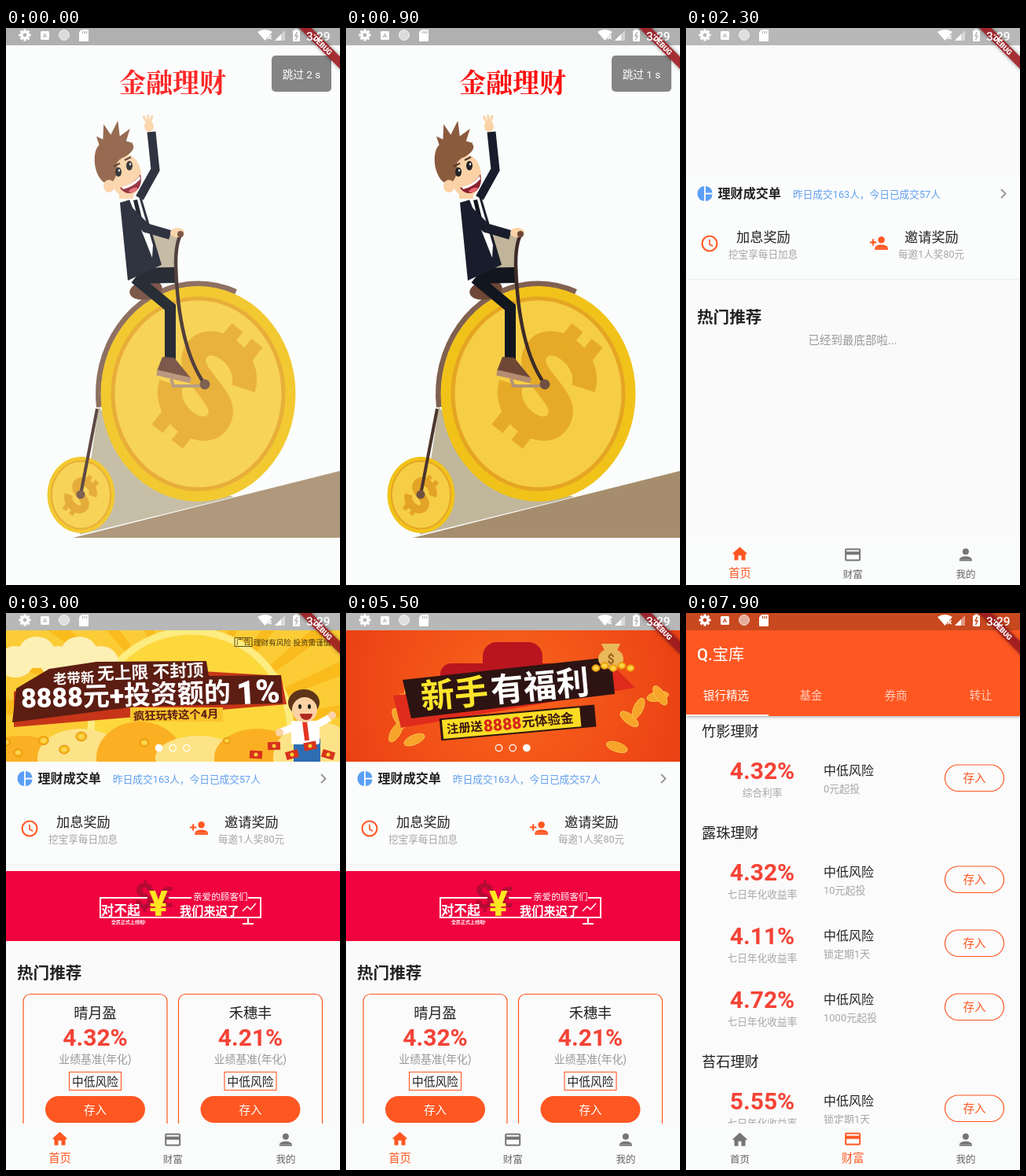
Write an HTML page with a canvas that moves like this. It is 425 px wide and 708 px high and loops after 8 s.

```html
<!DOCTYPE html>
<html lang="zh-CN">
<head>
<meta charset="utf-8">
<title>理财</title>
<style>
html, body { margin: 0; width: 100%; height: 100%; overflow: hidden; background: #fafafa; }
canvas { display: block; width: 425px; height: 708px; }
</style>
</head>
<body>
<canvas id="stage" width="425" height="708"></canvas>
<script>
const g = document.getElementById('stage').getContext('2d');
const W = 425, H = 708, LOOP = 8000, PI = Math.PI, TAU = PI * 2;
const SANS = 'Roboto, "Noto Sans CJK SC", "Noto Sans CJK", sans-serif';
const SERIF = '"Noto Serif CJK SC", "Noto Sans CJK SC", "Noto Sans CJK", serif';
const ORANGE = '#ff5722', RED = '#f44336', INK = '#222', GREY = '#a6a6a6', WHITE = '#fff';
const SKIN = '#fbd2a5', HAIR = '#8b5b3e', BLACK = { weight: 900 };

// ---------- drawing helpers ----------
function rect(x, y, w, h, fill) {
  g.fillStyle = fill;
  g.fillRect(x, y, w, h);
}

function paint(fill, stroke, width = 1) {
  if (fill) { g.fillStyle = fill; g.fill(); }
  if (stroke) { g.strokeStyle = stroke; g.lineWidth = width; g.stroke(); }
}

function round(x, y, w, h, r, fill, stroke, width) {
  g.beginPath();
  g.roundRect(x, y, w, h, r);
  paint(fill, stroke, width);
}

function oval(x, y, rx, ry, fill, stroke, width, turn = 0) {
  g.beginPath();
  g.ellipse(x, y, rx, ry, turn, 0, TAU);
  paint(fill, stroke, width);
}

function arc(x, y, rx, ry, from, to, fill, stroke, width) {
  g.beginPath();
  g.ellipse(x, y, rx, ry, 0, from, to);
  paint(fill, stroke, width);
}

function trace(pts) {
  g.beginPath();
  for (let i = 0; i < pts.length; i += 2) g.lineTo(pts[i], pts[i + 1]);
}

function poly(fill, ...pts) {
  trace(pts);
  g.closePath();
  paint(fill);
}

function line(color, width, ...pts) {
  trace(pts);
  paint(null, color, width);
}

function curve(d, fill, stroke, width) {
  const p = new Path2D(d);
  if (fill) { g.fillStyle = fill; g.fill(p); }
  if (stroke) { g.strokeStyle = stroke; g.lineWidth = width; g.stroke(p); }
}

// y is the middle of the glyphs
function text(s, x, y, size, color, { align = 'left', weight = 400, font = SANS } = {}) {
  g.font = `${weight} ${size}px ${font}`;
  g.textAlign = align;
  g.fillStyle = color;
  g.fillText(s, x, y + size * .37);
}
const mid = (s, x, y, size, color, opt) => text(s, x, y, size, color, { align: 'center', ...opt });

function at(x, y, turn, draw, scale = 1) {
  g.save();
  g.translate(x, y);
  g.rotate(turn);
  g.scale(scale, scale);
  draw();
  g.restore();
}

const tilted = (s, x, y, turn, size, color) => at(x, y, turn, () => text(s, 0, 0, size, color, BLACK));

function random(seed) {
  return () => (seed = seed * 16807 % 2147483647) / 2147483647;
}

const ramp = (t, from, to) => Math.min(1, Math.max(0, (t - from) / (to - from)));

// cubic-bezier(.25, .1, .25, 1)
function ease(t) {
  let lo = 0, hi = 1, u = t;
  for (let i = 0; i < 20; i++) {
    u = (lo + hi) / 2;
    if (.75 * u * (1 - u) + u ** 3 < t) lo = u; else hi = u;
  }
  return .3 * u * (1 - u) ** 2 + 3 * u * u * (1 - u) + u ** 3;
}

// ---------- icons, centred on 0,0 ----------
const ICON = {
  home(c) {
    poly(c, 0, -9, 10, 0, -10, 0);
    rect(-7, -1, 5, 9, c);
    rect(2, -1, 5, 9, c);
    rect(-7, -1, 14, 3, c);
  },
  card(c) {
    round(-9, -7, 18, 14, 1, null, c, 2);
    rect(-9, -4, 18, 4, c);
  },
  person(c) {
    oval(0, -4, 4, 4, c);
    arc(0, 6, 8, 4, PI, TAU, c);
    rect(-8, 6, 16, 2, c);
  },
  invite(c) {
    at(3, 0, 0, () => ICON.person(c));
    line(c, 2, -11, -1, -3, -1);
    line(c, 2, -7, -5, -7, 3);
  },
  pie(c) {
    arc(-1, 0, 9, 10, PI / 2, PI * 1.5, c);
    for (const s of [-1, 1]) {
      at(1, s, 0, () => {
        g.scale(1, s);
        g.beginPath();
        g.moveTo(0, 0);
        g.arc(0, 0, 9, 0, PI / 2);
        paint(c);
      });
    }
  },
  next(c) { line(c, 2, -2.500, -5.500, 3, 0, -2.500, 5.500); },
  clock(c) {
    oval(0, 0, 9, 9, null, c, 2);
    line(c, 1.6, 0, -5, 0, 1, 4, 3);
  }
};
const icon = (name, x, y, color, scale = 1) => at(x, y, 0, () => ICON[name](color), scale);

// ---------- status bar ----------
function statusBar(color) {
  rect(0, 0, W, 22, color);
  for (let i = 0; i < 8; i++) at(24, 9, i * TAU / 8, () => rect(-1.6, -7.5, 3.2, 4, WHITE));
  oval(24, 9, 4, 4, null, WHITE, 3.2);
  round(44, 4, 11, 11, 1.5, WHITE);
  mid('A', 49.5, 9.5, 8, color, { weight: 700 });
  oval(74, 9, 6.5, 6.5, 'rgba(255,255,255,.55)', 'rgba(255,255,255,.75)', 1);
  round(93, 2, 12, 15, [5, 1, 1, 1], WHITE);
  for (let i = 0; i < 3; i++) rect(97 + i * 2.5, 4, 1.2, 3, color);
  curve('M320 5Q329.5-1 339 5L329.5 16Z', WHITE);
  mid('×', 335.5, 12, 12, WHITE, { weight: 700 });
  poly('rgba(255,255,255,.45)', 342, 16, 355, 3, 355, 16);
  poly(WHITE, 342, 16, 350, 8, 350, 16);
  round(365, 3, 9, 14, 1, WHITE);
  rect(367.5, 1.5, 4, 2, WHITE);
  line(color, 1.5, 370.5, 5, 368, 10, 371, 10, 368.5, 15);
}

function ribbon() {
  at(W, 0, PI / 4, () => {
    g.shadowColor = 'rgba(0,0,0,.5)';
    g.shadowBlur = 5;
    rect(-40, 25.7, 80, 11, 'rgba(165,28,34,.85)');
    g.shadowBlur = 0;
    mid('DEBUG', 0, 31.2, 9.4, WHITE, BLACK);
  });
  text('3:29', 382, 10, 15.5, WHITE, { weight: 500 });
}

// ---------- splash ----------
function dollar(x, y, scale, color) {
  at(x, y, .67, () => {
    curve('M38-26C24-64-44-60-38-24C-32 8 32-8 38 24C44 60-24 64-38 26', null, color, 31);
    for (const sy of [-1, 1]) for (const sx of [-1, 1]) rect(sx * 16 - 9, sy * 66 - 16, 18, 32, color);
  }, scale);
}

function coin(x, y, rx, ry, rim) {
  oval(x, y, rx, ry, '#f1c31a');
  oval(x, y, rx * .875, ry * .885, '#f6ce45', '#e5a523', rim);
}

function bike() {
  poly('#a68d6d', 85, 648, W, 563, W, 648);
  poly('#c0b79d', 118, 481, 175, 560, 290, 596, 94, 644);
  arc(244.5, 465, 127, 140, 3.02, 5.1, null, '#806050', 7);
  coin(244.5, 465, 124, 137, 5);
  dollar(256, 455, 1, '#e6aa27');
  coin(95.5, 593.5, 43, 48.5, 2);
  dollar(95, 594, .33, '#e3a326');
  line('#4c352d', 4, 116, 484, 95, 593);
  oval(95, 593, 5.5, 5.5, '#705242');
}

function head() {
  rect(144, 200, 18, 17, SKIN);
  oval(153, 188, 19, 27, SKIN);
  oval(127, 172, 14, 26, HAIR, null, 0, -.15);
  oval(141, 156, 22, 11, HAIR, null, 0, -.3);
  for (let i = 0; i < 5; i++) {
    at(135, 160, -2.3 + i * .45, () => poly(HAIR, 0, -13, 30 + 13 * Math.sin(i * PI / 4), 0, 0, 13));
  }
  oval(131, 201, 7, 8, SKIN);
  for (const [x, y] of [[143, 183], [157, 175]]) {
    oval(x, y, 4, 6, '#252426');
    oval(x + 1, y - 2, 1.2, 1.5, WHITE);
    line('#51372b', 2, x - 6, y - 7, x + 2, y - 11);
  }
  curve('M145 203Q162 200 171 186Q175 205 159 210Q150 211 145 203Z', '#8d2230');
  curve('M147 202Q162 199 170 188L171 192Q162 202 149 205Z', WHITE);
  oval(162, 206, 6, 2.5, '#e76573', null, 0, -.4);
}

function rider() {
  const suit = '#191d2b', trousers = '#12161f', brown = '#6e4736';
  poly('#c0b59b', 184, 256, 220, 265, 215, 326, 188, 300);
  oval(178, 333, 21, 12, brown, null, 0, -.2);
  line(trousers, 20, 168, 315, 216, 314);
  line('#b09374', 4, 253, 455, 213, 455, 210, 446);
  curve('M222 263Q216 275 216 300Q219 405 253 453', null, '#3e2b28', 4.5);
  oval(253, 453, 6.5, 6.5, '#705040');
  line(trousers, 14, 164, 318, 209, 355, 209, 421);
  poly(brown, 199, 418, 214, 419, 236, 446, 192, 436);
  line('#b58c70', 7, 192, 438, 235, 448);

  poly(suit, 145, 222, 172, 214, 198, 301, 155, 321);
  poly(WHITE, 157, 218, 169, 214, 187, 276, 186, 292);
  poly('#11131c', 162, 219, 167, 218, 178, 262, 167, 240);
  line(suit, 11, 170, 216, 190, 180, 185, 132);
  line(suit, 12, 150, 226, 178, 254, 209, 263);
  oval(182, 125, 6, 7, SKIN);
  for (let i = -1; i < 2; i++) at(182, 125, i * .4 - .1, () => round(-1.5, -15, 3, 13, 1.5, SKIN));
  oval(218, 260, 9, 6, SKIN);
  oval(222, 262, 4, 4, brown);
  head();
}

function splash(t) {
  rect(0, 0, W, H, '#fafdfc');
  mid('金融理财', 212, 69, 34, '#fc1010', { font: SERIF, weight: 600 });
  bike();
  rider();
  rect(0, 0, W, H, `rgba(250,253,252,${.1 * (1 - ramp(t, 0, 900))})`);
  const left = t < 900 ? 2 : t < 1900 ? 1 : 0;
  round(338, 35, 76, 46, 5, '#858585');
  mid(`跳过 ${left} s`, 376, 59, 13.6, WHITE);
  statusBar('#b0b0b0');
}

// ---------- carousel ----------
function burst(x, y, n, color) {
  for (let i = 0; i < n; i++) at(x, y, i * TAU / n, () => poly(color, 0, 0, 400, -36, 400, 36));
}

function goldCoin(x, y, r) {
  oval(x, y, r, r * .85, '#f7b917', '#e18a12', 1);
  oval(x, y, r * .55, r * .45, '#fbd553');
}

function mascot() {
  line(WHITE, 9, 350, 151, 372, 143, 394, 143, 412, 133);
  rect(366, 160, 34, 29, '#2f6db3');
  round(363, 137, 36, 30, 3, WHITE);
  line('#e33522', 6, 380, 138, 383, 162);
  for (const [x, y] of [[348, 152], [415, 130]]) oval(x, y, 5, 5, SKIN);
  oval(379, 114, 20, 17, '#5f3519');
  oval(380, 123, 16, 16, SKIN);
  for (const x of [374, 386]) oval(x, 119, 2, 3, INK);
  arc(382, 128, 8, 8, 0, PI, '#b02a22');
}

function bonusBanner() {
  const rnd = random(11), brown = '#5c1d13';
  rect(0, 22, W, 167, '#fabb1d');
  burst(235, 150, 24, '#fccc36');
  oval(235, 150, 127, 127, '#fcd83d', '#fdec80', 9);
  for (let i = 0; i < 5; i++) oval(12 + i * 27, 62 - i % 2 * 12, 23, 20, '#fdf0b4');
  for (let i = 0; i < 6; i++) oval(20 + i * 75, 184, 55, 28 + i % 3 * 9, i % 2 ? '#fde387' : '#fbb024');
  for (let i = 0; i < 7; i++) goldCoin(rnd() * 340, 150 + rnd() * 32, 4 + rnd() * 4);

  poly('#c73518', 10, 100, 114, 66, 350, 80, 357, 116, 10, 145);
  poly(brown, 13, 96, 55, 71, 115, 62, 255, 61, 258, 80, 350, 79, 352, 115, 165, 119, 8, 139);
  rect(158, 120, 118, 18, '#fbc52c');
  tilted('老带新', 60, 84, -.05, 17.5, WHITE);
  tilted('无上限 不封顶', 116, 77, -.035, 21.7, WHITE);
  tilted('8888元+投资额的', 19, 108, -.03, 34, WHITE);
  tilted('1%', 293, 101, -.06, 42, WHITE);
  tilted('疯狂玩转这个4月', 162, 131, -.03, 14.3, brown);
  round(291, 31.5, 22, 11, 0, null, '#5a4a1a');
  text('广告', 293, 37, 9.3, '#4a3a10');
  text('理财有风险 投资需谨慎', 315, 37, 9.6, '#4a3a10');
  mascot();
  for (let i = 0; i < 5; i++) {
    at(318 + i * 23, 180 - i % 2 * 11, rnd() - .5, () => {
      rect(-8, -5, 16, 10, '#d8321c');
      oval(0, 0, 2.5, 2.5, '#f9cf3e');
    });
  }
}

function welcomeBanner() {
  const rnd = random(29), dark = '#2d1412';
  const bg = g.createRadialGradient(212, 100, 20, 212, 100, 240);
  bg.addColorStop(0, '#f9621c');
  bg.addColorStop(1, '#e93f13');
  rect(0, 22, W, 167, bg);
  round(174, 37, 76, 50, 18, '#b8151f');
  round(120, 64, 158, 30, 14, '#b8151f');
  for (const s of [-1, 1]) {
    for (let i = 0; i < 5; i++) {
      oval(212 + s * (125 + rnd() * 65), 100 + rnd() * 75, 14, 6, '#f6a42a', '#fbc550', 1, rnd() * 3);
    }
  }
  poly('#df2b1c', 60, 105, 345, 72, 368, 95, 70, 146);
  poly(dark, 72, 85, 337, 56, 342, 103, 83, 134);
  tilted('新手', 95, 106, -.09, 43, '#fde52b');
  tilted('有福利', 184, 98, -.09, 42, WHITE);
  at(123, 148, -.09, () => {
    rect(-3, -14, 198, 28, dark);
    rect(0, -12, 176, 24, '#fbdc25');
    text('注册送', 5, 0, 15.3, '#3a1710', BLACK);
    text('8888', 52, 0, 21, '#d8281c', BLACK);
    text('元体验金', 101, 0, 16.5, '#3a1710', BLACK);
  });
  poly('#e9b85a', 325, 39, 349, 39, 343, 52, 331, 52);
  oval(337, 58, 16, 13, '#e9b85a');
  mid('$', 337, 58, 16, '#9a611d', { weight: 700 });
  for (let i = 0; i < 5; i++) goldCoin(318 + i * 11, 70 - i % 2 * 3, 5);
}

function carousel(t) {
  const p = ease(ramp(t, 5000, 5500));
  g.save();
  g.beginPath();
  g.rect(0, 22, W, 167);
  g.clip();
  if (p < 1) at(-p * W, 0, 0, bonusBanner);
  if (p > 0) at((1 - p) * W, 0, 0, welcomeBanner);
  const active = p < .5 ? 0 : 2;
  for (let i = 0; i < 3; i++) oval(194.5 + i * 17.7, 171.5, 4.2, 4.2, i === active ? WHITE : null, WHITE, 1.2);
  g.restore();
}

// ---------- home ----------
function notice() {
  rect(0, 328, W, 89, '#f0033f');
  mid('$', 176, 358, 45, '#b50a35', BLACK);
  mid('€', 203, 361, 36, '#b50a35', BLACK);
  line(WHITE, 2, 180, 362, 120, 362, 120, 387, 324, 387, 324, 362, 308, 362);
  line(WHITE, 2, 207, 362, 236, 362);
  text('对不起', 121, 378, 16.6, WHITE, BLACK);
  text('我们来迟了', 221, 378, 15.2, WHITE, BLACK);
  mid('¥', 194, 368.5, 44, '#ffe620', BLACK);
  text('亲爱的顾客们', 238, 361, 11.6, WHITE);
  text('全民正式上线啦!', 134, 393, 6, WHITE, { weight: 700 });
  line(WHITE, 1.5, 301, 379, 307, 373, 311, 377, 318, 369);
  line(WHITE, 2, 308, 387, 308, 395);
  line(WHITE, 2, 301, 395, 315, 395);
}

function offer(x, name, rate) {
  const c = x + 91.5;
  round(x, 484.5, 183, 190, 9, '#fbfbfb', ORANGE, 1.2);
  mid(name, c, 508, 18.2, INK);
  mid(rate, c, 539, 30, RED, { weight: 700 });
  mid('业绩基准(年化)', c, 567, 13.8, '#999');
  round(c - 33, 583.5, 66, 23, 0, null, ORANGE, 1.1);
  mid('中低风险', c, 595.5, 14.7, INK);
  round(c - 63.5, 614, 127, 34, 17, ORANGE);
  mid('存入', c, 632, 14.6, WHITE);
}

function home(t) {
  const loaded = t >= 2800, listed = t >= 3000;
  rect(0, 0, W, H, '#fafafa');
  if (loaded) carousel(t);
  rect(0, 189, W, 130, '#fbfcfc');
  rect(0, 319, W, 1, '#f0f0f0');
  icon('pie', 24, 210.5, '#5b9ff5', .95);
  text('理财成交单', 40.5, 210.5, 16.1, INK, { weight: 700 });
  text('昨日成交163人，今日已成交57人', 136, 211, 12.7, '#5f9ff0');
  icon('next', 403.5, 210.5, '#999');

  icon('clock', 30, 274, ORANGE, 1.05);
  text('加息奖励', 64, 265.5, 17.2, INK);
  text('挖宝享每日加息', 54, 287, 12.6, GREY);
  icon('invite', 245.5, 273.5, ORANGE, 1.05);
  text('邀请奖励', 278, 265.5, 17.2, INK);
  text('每邀1人奖80元', 270, 287, 12.6, GREY);

  const shift = loaded ? 90 : 0;
  if (loaded) notice();
  text('热门推荐', 14, 367.5 + shift, 20.6, INK, { weight: 700 });
  if (listed) {
    offer(22, '晴月盈', '4.32%');
    offer(219.5, '禾穗丰', '4.21%');
  } else {
    mid('已经到最底部啦...', 212, 397 + shift, 14.5, '#999');
  }
  statusBar('#b8b8b8');
}

// ---------- wealth ----------
const YEARLY = '七日年化收益率';
const FUNDS = [
  { name: '竹影理财', rows: [['4.32%', '综合利率', '0元起投']] },
  { name: '露珠理财', rows: [['4.32%', YEARLY, '10元起投'], ['4.11%', YEARLY, '锁定期1天'], ['4.72%', YEARLY, '1000元起投']] },
  { name: '苔石理财', rows: [['5.55%', YEARLY, '锁定期1天']] }
];

function fundRow(y, [rate, kind, terms]) {
  mid(rate, 97, y, 30, RED, { weight: 700 });
  mid(kind, 97, y + 28, 12.7, GREY);
  text('中低风险', 175, y + .5, 16, INK);
  text(terms, 175, y + 23, 13, GREY);
  round(329.5, y - 7, 75, 33.5, 16.8, null, ORANGE, 1.2);
  mid('存入', 367, y + 10, 14.6, ORANGE);
}

function fundList() {
  let y = 150;
  for (const { name, rows } of FUNDS) {
    text(name, 20, y, 18.2, INK);
    rows.forEach((row, i) => fundRow(y + 50 + i * 81, row));
    y += 48 + rows.length * 81;
  }
}

function wealth(t) {
  rect(0, 0, W, H, '#fbfbfb');
  if (t < 7600) mid('已经到最底部啦...', 212, 142, 14.5, '#999');
  else fundList();
  g.save();
  g.shadowColor = 'rgba(0,0,0,.35)';
  g.shadowBlur = 4;
  g.shadowOffsetY = 1;
  rect(0, 22, W, 109, ORANGE);
  g.restore();
  text('Q.宝库', 14, 52, 20.3, WHITE, { weight: 500 });
  ['银行精选', '基金', '券商', '转让'].forEach((s, i) =>
    mid(s, 51 + i * 108, 105, 14.6, i ? 'rgba(255,255,255,.7)' : WHITE, { weight: i ? 400 : 500 }));
  rect(0, 129, 105, 2, WHITE);
  statusBar('#c8481f');
}

function tabBar(t) {
  const move = ramp(t, 7300, 7400);
  rect(0, 649, W, 59, '#fafcfb');
  [['home', '首页'], ['card', '财富'], ['person', '我的']].forEach(([name, label], i) => {
    const x = 68.5 + i * 143.7;
    const on = [1 - move, move, 0][i];
    const active = on >= .5;
    icon(name, x, 669.5 - on, active ? ORANGE : '#757575');
    mid(label, x, 694.5 - on * 2, 12.5 + on * 1.8, active ? ORANGE : '#666');
  });
}

function draw(t) {
  if (t < 2300) {
    splash(t);
  } else {
    if (t < 7300) home(t); else wealth(t);
    tabBar(t);
  }
  ribbon();
}

const start = performance.now();
function tick() {
  draw((performance.now() - start) % LOOP);
  requestAnimationFrame(tick);
}
tick();
</script>
</body>
</html>
```
